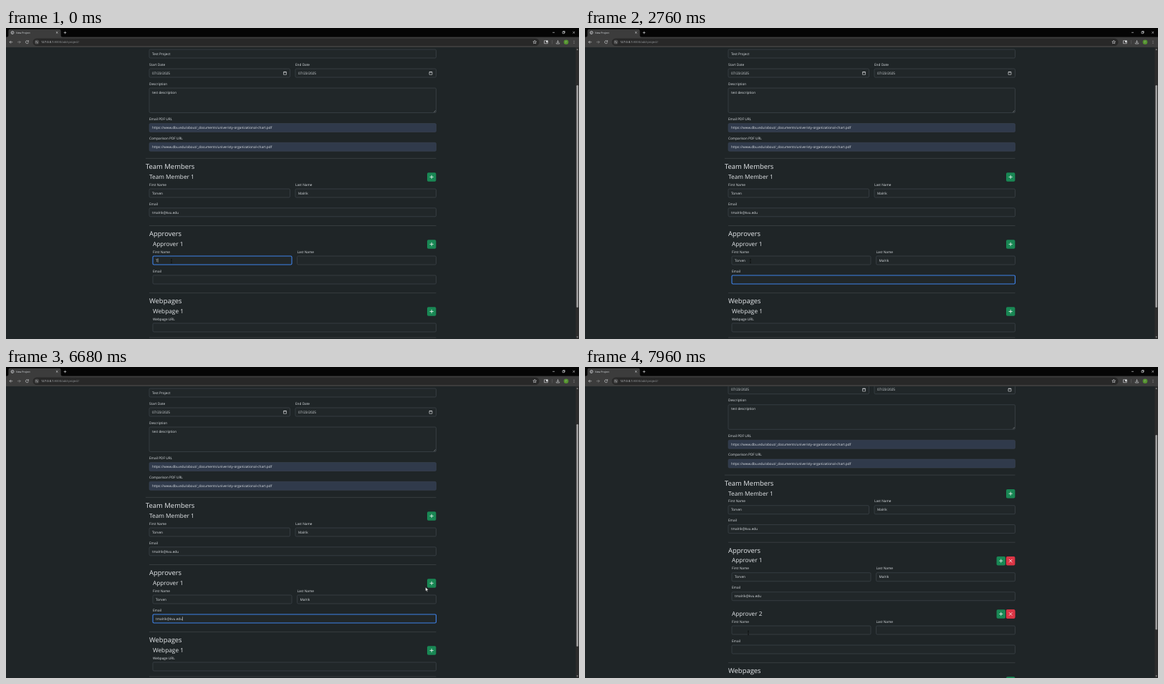
An HTML page for the animation above (8000 ms loop, 800x435 px).

```html
<!DOCTYPE html>
<html lang="en">
<head>
<meta charset="utf-8">
<title>New Project</title>
<style>
  html, body { margin: 0; width: 100%; height: 100%; overflow: hidden; background: #1f2527; }
  svg { display: block; width: 800px; height: 435px; }
  text { font-family: "Open Sans", "Noto Sans", sans-serif; fill: #dee2e6; text-rendering: geometricPrecision; white-space: pre; }
  .heading { font-weight: 500; fill: #e6e9ec; }
  .field { fill: #212729; stroke: #495057; stroke-width: .55; }
  .filled { fill: #303a4b; stroke: #3d4757; }
  .focused { stroke: #3f83ea; stroke-width: 1.1; }
  .rule { stroke: #4a5054; stroke-width: .55; }
  .icon { fill: none; stroke: #d4d6d8; stroke-width: .65; }
  .glyph { fill: none; stroke: #fff; stroke-width: .75; }
</style>
</head>
<body>
<svg viewBox="0 0 800 435">
  <defs><clipPath id="view"><path d="M0 27H800V435H0Z"/></clipPath></defs>
  <rect width="800" height="435" fill="#1f2527"/>
  <g clip-path="url(#view)"><g id="page"></g></g>
  <g id="chrome"></g>
  <g id="cursor">
    <path id="arrow" d="M0 0V5.6L1.3 4.4 2.2 6.4 3.1 6 2.2 4.1H4Z" fill="#fff" stroke="#000" stroke-width=".35"/>
    <path id="hand" d="M0 .4Q.6-.3 1.1.4V2.4L3.8 3Q4.4 3.3 4.1 4.2L3.6 6.3H.5L-1.3 3.8Q-1.3 3-.6 3.2L0 3.7Z" fill="#fff" stroke="#000" stroke-width=".35"/>
    <path id="beam" d="M-1-2.6H1M0-2.6V2.6M-1 2.6H1" fill="none" stroke="#07090a" stroke-width=".6"/>
  </g>
</svg>
<script>
const LOOP = 8000, BODY = 4.735, SECTION = 9.45, ITEM = 8.27;
const ADD_TIME = 6960, ROW = 74.3, NOTCH = 31.25;
const person = { first: "Torven", last: "Malrik", email: "tmalrik@kvu.edu" };
const chart = "https://www.dbu.edu/about/_documents/univeristy-organizational-chart.pdf";
const $ = id => document.getElementById(id);

// Text is placed by the middle of its capitals.
const text = (x, y, s, size = BODY, attrs = "") =>
  `<text x="${x}" y="${y + size * .36}" font-size="${size}" ${attrs}>${s}</text>`;
const heading = (x, y, s, size) => text(x, y, s, size, 'class="heading"');
const box = (x, y, right, h = 12, attrs = 'class="field"') =>
  `<rect x="${x}" y="${y}" width="${right - x}" height="${h}" rx="1.6" ${attrs}/>`;
const rule = (y, x = 200) => `<path class="rule" d="M${x} ${y}H600.5"/>`;
const icon = (d, attrs = "") => `<path class="icon" d="${d}" ${attrs}/>`;

function field(x, y, right, label, value = "", id = "") {
  const ids = id ? [`id="${id}-box"`, `id="${id}"`] : ["", ""];
  return text(x, y, label) + box(x, y + 6, right, 12, `class="field" ${ids[0]}`) +
    text(x + 4, y + 12, value, BODY, ids[1]);
}
const urlField = (y, label) => text(200, y, label) +
  box(200, y + 6.3, 600.5, 12, 'class="field filled"') + text(204, y + 12.3, chart);
const calendar = (x, y) =>
  icon(`M${x - 2} ${y - 1.5}h4v3.7h-4ZM${x - 2} ${y - 1.1}h4M${x - 1} ${y - 2.3}v1M${x + 1} ${y - 2.3}v1`);

function button(y, kind = "add", id = "") {
  const shape = kind === "add" ? "M591.6 6.2h5.2M594.2 3.6v5.2" : "M592 4l4.4 4.4M596.4 4l-4.4 4.4";
  const color = kind === "add" ? "#198754" : "#dc3545";
  return `<g ${id && `id="${id}"`} transform="translate(0 ${y})">` +
    `<rect x="588" width="12.4" height="12.5" rx="1.8" fill="${color}"/><path class="glyph" d="${shape}"/></g>`;
}

function approver(n, id = "") {
  const name = key => id && id + key;
  return heading(205, 301.7, `Approver ${n}`, ITEM) +
    button(296.2, "add", name("add")) + button(296.2, "remove", name("remove")) +
    field(205, 313, 399, "First Name", "", name("first")) +
    field(406.5, 313, 600.5, "Last Name", "", name("last")) +
    field(205, 340, 600.5, "Email", "", name("email"));
}

$("page").innerHTML =
  box(200, 30, 600.5) + text(204, 36.2, "Test Project") +
  field(200, 51, 396.5, "Start Date", "07/23/2025") + calendar(389.5, 63) +
  field(404, 51, 600.5, "End Date", "07/23/2025") + calendar(593, 63) +
  text(200, 78, "Description") + box(200, 84, 600.5, 34.5) + text(204, 90, "test description") +
  icon("M597.3 117.7l2.4-2.4M598.7 117.7l1-1", 'style="stroke-width:.35"') +
  urlField(127.2, "Email PDF URL") + urlField(154, "Comparison PDF URL") +
  rule(182.4, 195) + heading(195, 194, "Team Members", SECTION) +
  heading(200, 207.8, "Team Member 1", ITEM) + button(202.2) +
  field(200, 219, 396.5, "First Name", person.first) +
  field(404, 219, 600.5, "Last Name", person.last) +
  field(200, 245.8, 600.5, "Email", person.email) +
  rule(276.5) + heading(200, 288, "Approvers", SECTION) + approver(1, "a-") +
  `<g id="second" transform="translate(0 ${ROW})">${approver(2)}${button(296.2, "remove")}</g>` +
  `<g id="webpages">${rule(370.6)}${heading(200, 382, "Webpages", SECTION)}` +
  heading(205, 395.6, "Webpage 1", ITEM) + button(390.3) +
  field(205, 407, 600.5, "Webpage URL") + rule(433) + "</g>" +
  '<rect id="caret" width=".45" height="5.6" fill="#fff"/>';

// The second approver's add button sits left of its remove button.
$("second").querySelector("g").setAttribute("transform", "translate(-13.4 296.2)");

$("chrome").innerHTML =
  '<rect width="800" height="13" fill="#050505"/>' +
  '<path d="M1 13Q3.4 13 3.4 10.6V4Q3.4 1.8 5.6 1.8H74.4Q76.6 1.8 76.6 4V10.6Q76.6 13 79 13Z" fill="#3c3c3c"/>' +
  '<rect y="12.6" width="800" height="14.4" fill="#3c3c3c"/>' +
  '<rect x="37.5" y="14.4" width="707" height="10.6" rx="5.3" fill="#282828"/>' +
  '<circle cx="43" cy="19.7" r="3.5" fill="#3c3c3c"/>' +
  icon("M7 6.5a2 2 0 1 0 4 0a2 2 0 1 0-4 0M7.3 5.6L9 6.5 8.6 8.4M9.2 4.6L10.8 6") +
  text(14, 6.5, "New Project", 3.54) +
  icon("M69.9 5.1l2.6 2.6M72.5 5.1l-2.6 2.6M82.5 4.7v3.6M80.7 6.5h3.6") +
  icon("M763 6.3h3M777 5.2h2.5v2.5H777ZM777.8 5.2V4.5h2.4v2.4h-.7M791.4 5l2.7 2.7M794.1 5l-2.7 2.7") +
  icon("M9.2 19.7H5M6.9 17.8L5 19.7l1.9 1.9") +
  icon("M16 19.7h4.2M18.3 17.8l1.9 1.9-1.9 1.9", 'opacity=".55"') +
  icon("M31.2 18.7a2 2 0 1 0 .2 1.5M31.4 17.3v1.6h-1.6") +
  icon("M41.1 18.7h1.5M43.8 18.7h1.1M41.1 20.7h1.1M43.4 20.7h1.5M42.6 18.2v1M43.3 20.2v1") +
  text(49, 19.7, '127.0.0.1<tspan fill="#969a9d">:8000/add-project/</tspan>', 4.13) +
  icon("M738.2 17.3l.7 1.6 1.7.1-1.3 1.1.4 1.7-1.5-.9-1.5.9.4-1.7-1.3-1.1 1.7-.1Z") +
  icon("M751.5 17.7h4.8v4h-4.8Z") + '<path d="M754 17.7h2.5v2.4H754Z" fill="#d4d6d8"/>' +
  '<path d="M762.5 17v5.4" stroke="#666" stroke-width=".5"/>' +
  icon("M770.5 17v3.5M769 19.2l1.5 1.5 1.5-1.5M768.3 20.7v1.3h4.4v-1.3") +
  '<circle cx="782" cy="19.7" r="3.3" fill="#54932f"/>' +
  text(782, 19.7, "T", 3.3, 'text-anchor="middle"') +
  [17.9, 19.7, 21.5].map(y => `<circle cx="793" cy="${y}" r=".45" fill="#d4d6d8"/>`).join("") +
  '<rect x="795.4" y="27" width="4.6" height="408" fill="#2c2c2c"/>' +
  '<path d="M796.5 30.8L797.7 29l1.2 1.8ZM796.5 431.6l1.2 1.8 1.2-1.8Z" fill="#9f9f9f"/>' +
  '<rect id="thumb" x="796.4" width="2.6" rx="1.3" fill="#9f9f9f"/>';

const entries = [
  { id: "a-first", value: person.first, focus: 0, blur: 780, start: 0, step: 130 },
  { id: "a-last", value: person.last, focus: 780, blur: 2100, start: 860, step: 170 },
  { id: "a-email", value: person.email, focus: 2100, blur: ADD_TIME, start: 3510, step: 150 }
];
const track = [
  [0, 231, 326], [6180, 231, 326], [6680, 585.7, 308], [6820, 593.5, 303],
  [7040, 593.5, 303], [7400, 383.4, 316.3], [7760, 228, 371.8], [LOOP, 228, 371.8]
];
const clamp = v => Math.max(0, Math.min(1, v));
const ease = v => v * v * (3 - 2 * v);
const show = (id, on) => $(id).setAttribute("visibility", on ? "visible" : "hidden");
const move = (id, x, y) => $(id).setAttribute("transform", `translate(${x} ${y})`);

function drawEntries(t) {
  let caretOn = false;
  for (const e of entries) {
    const typed = t < e.start ? 0 : Math.min(e.value.length, Math.floor((t - e.start) / e.step) + 1);
    const label = $(e.id), active = t >= e.focus && t < e.blur;
    label.textContent = e.value.slice(0, typed);
    $(e.id + "-box").classList.toggle("focused", active);
    if (!active) continue;
    const lastKey = typed ? e.start + (typed - 1) * e.step : e.focus;
    caretOn = Math.floor((t - lastKey) / 530) % 2 === 0;
    const width = typed ? label.getComputedTextLength() : 0;
    $("caret").setAttribute("x", +label.getAttribute("x") + width + .2);
    $("caret").setAttribute("y", +label.getAttribute("y") - 4.5);
  }
  show("caret", caretOn);
}

function drawCursor(t) {
  const i = track.findIndex((p, n) => n && t <= p[0]);
  const [a, b] = [track[i - 1], track[i]];
  const k = ease(clamp((t - a[0]) / (b[0] - a[0])));
  move("cursor", a[1] + (b[1] - a[1]) * k, a[2] + (b[2] - a[2]) * k);
  const kind = t < 6260 || t > 7660 ? "beam" : t > 6760 && t < 7080 ? "hand" : "arrow";
  for (const id of ["arrow", "hand", "beam"]) show(id, id === kind);
  $("a-add").firstChild.setAttribute("fill", kind === "hand" ? "#157347" : "#198754");
}

function draw(t) {
  const added = t >= ADD_TIME;
  const scroll = NOTCH * ease(clamp((t - 7315) / 160));
  move("page", 0, -scroll);
  move("webpages", 0, added ? ROW : 0);
  move("a-add", added ? -13.4 : 0, 296.2);
  show("second", added);
  show("a-remove", added);
  $("thumb").setAttribute("y", (added ? 74 : 80) + scroll * .67);
  $("thumb").setAttribute("height", added ? 272.5 : 311);
  drawEntries(t);
  drawCursor(t);
}

const began = performance.now();
function tick() {
  draw((performance.now() - began) % LOOP);
  requestAnimationFrame(tick);
}
tick();
</script>
</body>
</html>
```
